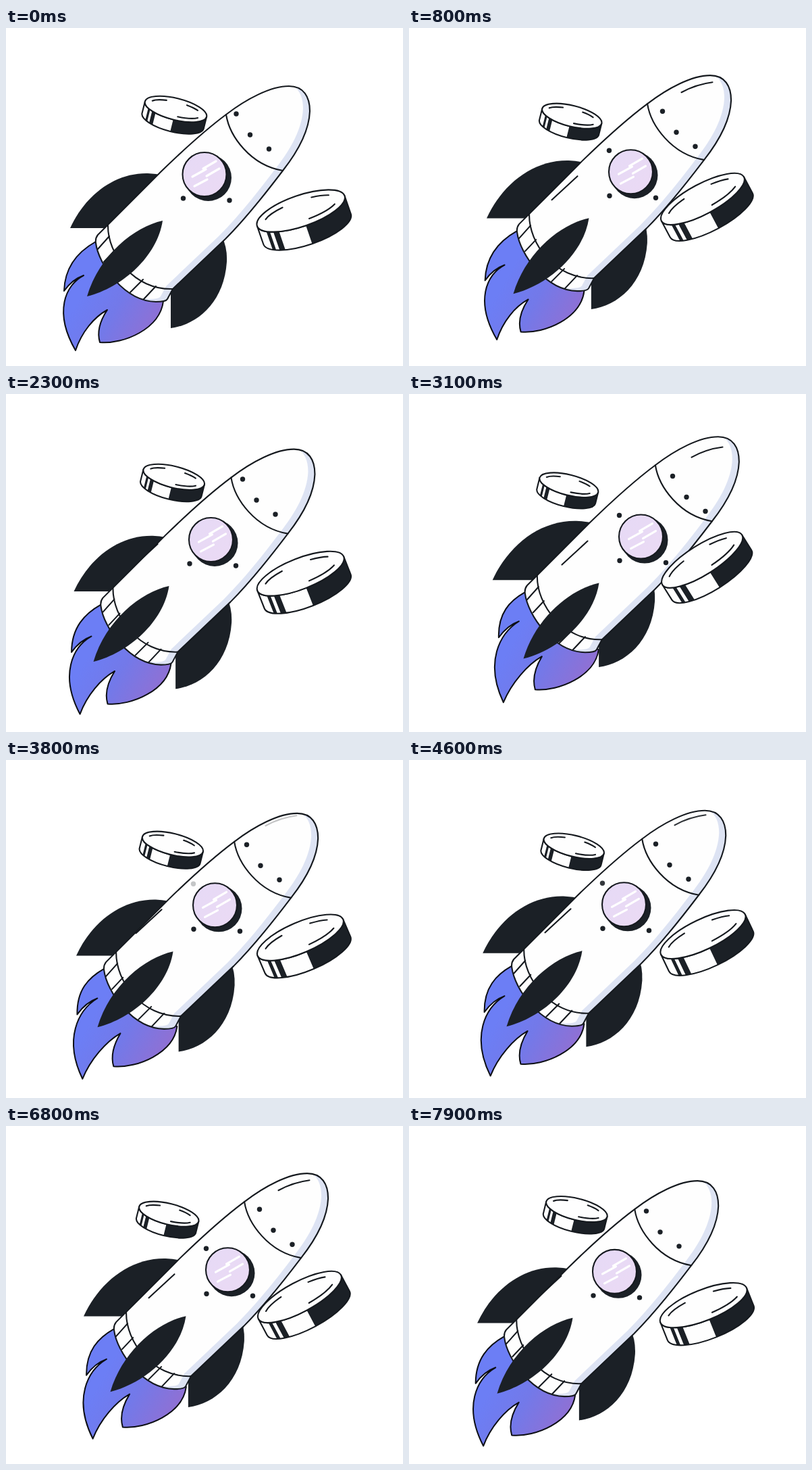
An HTML page for the animation above (8000 ms loop, 588 by 500 pixels).

```html
<!DOCTYPE html>
<html lang="en">
<head>
<meta charset="utf-8">
<title>Rocket and coins</title>
<style>
  html, body { margin: 0; width: 100%; height: 100%; overflow: hidden; background: #fff; }
  svg { display: block; width: 588px; height: 500px; }
  .line { fill: none; stroke: #15191e; stroke-width: 2.1; stroke-linecap: round; stroke-linejoin: round; }
  .dark { fill: #1b2026; }
  .white { fill: #fefefe; }
</style>
</head>
<body>
<svg viewBox="0 0 588 500">
  <defs>
    <path id="hull" d="M151 291 L229 213 C262 181 295 151 326 128 C356 105 392 86 419 86 C441 86 450 102 450 123 C449 152 432 183 410 211 C385 244 357 280 325 312 L247 386 L239 401 Q237 405 222 405 C175 404 137 350 133 318 Q132 311 136 306 Z"/>
    <clipPath id="hullClip"><use id="clipHull" href="#hull"/></clipPath>
    <clipPath id="fixedClip"><use href="#hull"/></clipPath>
    <linearGradient id="fire" gradientUnits="userSpaceOnUse" x1="120" y1="380" x2="225" y2="440">
      <stop offset="0" stop-color="#6c7ef5"/>
      <stop offset=".45" stop-color="#7379e9"/>
      <stop offset="1" stop-color="#9070d3"/>
    </linearGradient>
    <linearGradient id="glass" x1="0" y1="0" x2="1" y2="1">
      <stop offset="0" stop-color="#e6daf6"/>
      <stop offset="1" stop-color="#ebdaf4"/>
    </linearGradient>
  </defs>

  <g id="flameLayer">
    <path id="flame" fill="url(#fire)" stroke="#0c0e14" stroke-width="2" stroke-linejoin="round"/>
  </g>
  <path id="leftFin" class="dark" d="M0 0 C22 -48 65 -82 115 -81 Q140 -80 160 -70 L60 0 Z"/>
  <path id="rightFin" class="dark" d="M244 444 C283 439 323 406 327 346 Q328 325 320 309 L300 300 L244 380 Z"/>

  <g id="body">
    <use href="#hull" fill="#dde3f3"/>
    <g clip-path="url(#fixedClip)"><use href="#hull" class="white" transform="translate(-10 -4)"/></g>
    <g class="line">
      <use href="#hull"/>
      <path d="M151 291 C150 335 190 388 247 386 M326 128 C331 160 362 203 410 211"/>
      <path d="M136 327 L153 308 M145 346 L161 329 M184 391 L203 372 M204 401 L222 382"/>
    </g>
  </g>

  <g clip-path="url(#hullClip)">
    <g id="trim">
      <path class="line" d="M177 258 L215 223"/>
      <g id="edgeTrim">
        <path class="line" d="M369 99 Q391 87 415 84"/>
        <circle class="dark" cx="262" cy="185" r="3.7"/>
      </g>
    </g>
  </g>

  <g id="details">
    <g class="dark">
      <circle cx="341" cy="127" r="3.7"/>
      <circle cx="361.5" cy="158" r="3.7"/>
      <circle cx="389.5" cy="179" r="3.7"/>
      <circle cx="262.5" cy="252" r="3.7"/>
      <circle cx="331" cy="255" r="3.7"/>
      <circle cx="299.5" cy="221.5" r="34.5"/>
    </g>
    <circle cx="294" cy="216.5" r="32.5" fill="url(#glass)" stroke="#15191e" stroke-width="2.1"/>
    <path d="M292 208 L311 197 M276 220 L296 209 M297 219 L316 208 M279 234 L298 224" fill="none" stroke="#fff" stroke-width="3.2" stroke-linecap="round"/>
    <path class="dark" d="M232 285 C190 294 138 336 120 397 C172 384 224 338 232 285 Z"/>
  </g>

  <g id="coinA"></g>
  <g id="coinB"></g>
</svg>
<script>
const $ = id => document.getElementById(id);
const LOOP = 8000, STEP = 100, CYCLE = 2000, START = 110;
const mix = (a, b, k) => a + (b - a) * k;

// Flame sway through the loop: [time, amount]
const SWAY = [[0, 0], [1500, -.1], [3100, 1], [4600, .8], [5500, .95], [6800, .75], [8000, .55]];

function sway(t) {
  const i = SWAY.findIndex(p => p[0] > t);
  const [t0, a] = SWAY[i - 1], [t1, b] = SWAY[i];
  const k = (t - t0) / (t1 - t0);
  return mix(a, b, k * k * (3 - 2 * k));
}

// Steady glide up and back, 0 to 50
function glide(t) {
  if (t < START) return 0;
  return 50 - Math.abs((t - START) % CYCLE - CYCLE / 2) / 20;
}

function flamePath(w) {
  const p = (x, y, dx, dy) => `${x + dx * w} ${y + dy * w} `;
  return 'M133 316 C' + p(108, 330, 2, -1) + p(87, 352, 6, -5) + p(86, 389, 8, -6)
    + 'Q' + p(98, 372, 9, -7) + p(115, 366, 9, -7)
    + 'C' + p(88, 380, 7, -3) + p(70, 420, 3, 0) + p(103, 477, -2, 2)
    + 'C' + p(112, 450, 1, 0) + p(130, 428, 7, -5) + p(150, 417, 8, -6)
    + 'C' + p(140, 432, 9, -6) + p(134, 448, 9, -5) + p(139, 465, 9, -5)
    + 'C' + p(175, 468, 8, -5) + p(228, 445, 9, -5) + p(233, 404, 9, -3)
    + 'L210 380 L150 310 Z';
}

function arc(rx, ry, from, to) {
  const at = d => `${rx * Math.cos(d * Math.PI / 180)} ${ry * Math.sin(d * Math.PI / 180)}`;
  return `M${at(from)} A${rx} ${ry} 0 0 1 ${at(to)}`;
}

function drawCoin(id, x, y, angle, rx, ry, depth) {
  // Strip of the rim between two fractions of the radius
  const band = (a, b) => {
    const ya = ry * Math.sqrt(1 - a * a), yb = ry * Math.sqrt(1 - b * b);
    return `M${a * rx} ${ya} A${rx} ${ry} 0 0 0 ${b * rx} ${yb} v${depth} A${rx} ${ry} 0 0 1 ${a * rx} ${ya + depth} Z`;
  };
  const ix = rx * .83, iy = ry * .65;
  const g = $(id);
  g.setAttribute('transform', `translate(${x} ${y}) rotate(${angle})`);
  g.innerHTML = `
    <path class="white" d="${band(-1, 1)}"/>
    <path class="dark" d="${band(-.85, -.78) + band(-.71, -.59) + band(0, 1)}"/>
    <path class="line" d="${band(-1, 1)}"/>
    <ellipse rx="${rx}" ry="${ry}" fill="#fefefe" stroke="#15191e" stroke-width="2.1"/>
    <path class="line" d="${arc(ix, iy, 200, 245) + arc(ix, iy, 292, 325) + arc(ix, iy, 27, 82)}"/>`;
}

function shift(id, x, y, extra = '') {
  $(id).setAttribute('transform', `translate(${x} ${y}) ${extra}`);
}

function draw(t) {
  const v = glide(t), k = v / 49;
  const bx = v * .785, by = v * -.46;
  for (const id of ['body', 'clipHull', 'flameLayer']) shift(id, bx, by);
  for (const id of ['details', 'trim']) shift(id, v, v * -.11);
  shift('leftFin', 95 + v * .58, 296 - v * .42, `scale(${1 + .08 * k})`);
  shift('rightFin', v * .75, v * -.81);
  $('edgeTrim').setAttribute('opacity', Math.min(1, Math.max(0, (v - 12) / 14)));
  $('flame').setAttribute('d', flamePath(sway(t)));

  const s = 1 - .05 * k;
  drawCoin('coinA', 251.5 - 14.5 * k, 120 + 14.5 * k, 14, 47 * s, 16 * s, 18 * s);
  drawCoin('coinB', mix(436.7, 434.2, k), mix(270.5, 245.5, k), mix(-19, -32, k),
    mix(68.5, 69.5, k), mix(23, 22, k), mix(28.5, 26.5, k));
}

const begin = performance.now();
function tick() {
  const t = (performance.now() - begin) % LOOP;
  draw(Math.floor(t / STEP) * STEP);
  requestAnimationFrame(tick);
}
tick();
</script>
</body>
</html>
```
